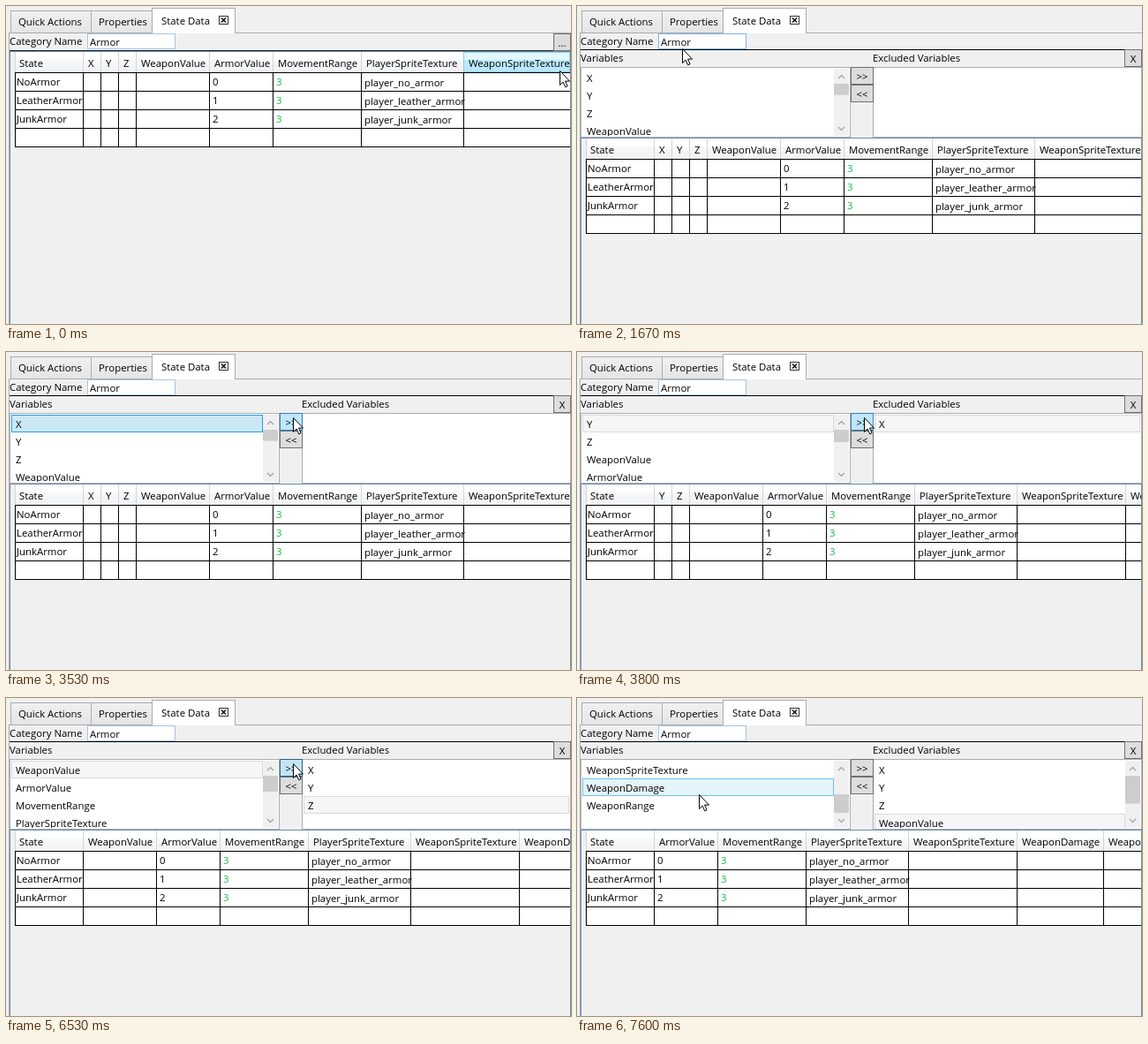
An HTML page for the animation above (8 s loop, 640x360 px).

```html
<!DOCTYPE html>
<html lang="en">
<head>
<meta charset="utf-8">
<title>State data editor</title>
<style>
html, body { margin: 0; width: 100%; height: 100%; overflow: hidden; background: #f0f0f0; }
svg { display: block; width: 640px; height: 360px; }
text { font: 11.4px "Open Sans", "Noto Sans", sans-serif; white-space: pre; }
</style>
</head>
<body>
<svg viewBox="0 0 640 360">
  <defs>
    <linearGradient id="head" x2="0" y2="1">
      <stop offset=".4" stop-color="#fff"/><stop offset=".4" stop-color="#f7f8fa"/><stop offset="1" stop-color="#f1f2f4"/>
    </linearGradient>
    <linearGradient id="headHover" x2="0" y2="1">
      <stop offset=".4" stop-color="#e3f7ff"/><stop offset=".4" stop-color="#bdedff"/><stop offset="1" stop-color="#b7e7fb"/>
    </linearGradient>
    <linearGradient id="tab" x2="0" y2="1">
      <stop stop-color="#f0f0f0"/><stop offset="1" stop-color="#e5e5e5"/>
    </linearGradient>
    <clipPath id="listView"><rect y="71" width="640" height="76"/></clipPath>
  </defs>
  <g id="stage"></g>
</svg>
<script>
const LOOP = 8000;
const VARIABLES = [
  ['X', 20], ['Y', 20], ['Z', 20], ['WeaponValue', 83], ['ArmorValue', 72], ['MovementRange', 100],
  ['PlayerSpriteTexture', 116], ['WeaponSpriteTexture', 123], ['WeaponDamage', 98], ['WeaponRange', 90]
].map(([name, width]) => ({ name, width }));
const STATES = [['NoArmor', 'player_no_armor'], ['LeatherArmor', 'player_leather_armor'], ['JunkArmor', 'player_junk_armor']];

// All times below count ticks of 1/15 s.
const OPEN_PRESS = 16, OPEN = 18, SELECT = 34, SCROLL = 114;
const CLICKS = [[55, 57], [67, 70], [83, 85], [98, 101]];
const PATH = [
  [0, 627, 73], [9, 630, 40], [21, 630, 40], [25, 119, 48], [26, 119, 48], [30, 81, 75], [37, 81, 75],
  [41, 152, 77], [50, 321, 75], [51, 321, 75], [53, 325, 74], [104, 325, 74], [111, 138, 109]
];
const BUTTON = { normal: ['#ddd', '#707070'], hover: ['#bee6fd', '#3c7fb1'], pressed: ['#c4e5f6', '#2c628b'] };
const ITEM = { hover: ['#e5f3fb', '#70c0e7'], active: ['#cbe8f6', '#26a0da'], inactive: ['#f6f6f6', '#dadada'] };

const rect = (x, y, w, h, fill) => `<rect x="${x}" y="${y}" width="${w}" height="${h}" fill="${fill}"/>`;
const box = (x, y, w, h, fill, edge) => rect(x, y, w, h, edge) + rect(x + 1, y + 1, w - 2, h - 2, fill);
const text = (x, y, s, fill = '#000', anchor = 'start') =>
  `<text x="${x}" y="${y}" fill="${fill}" text-anchor="${anchor}">${s.replace(/</g, '&lt;')}</text>`;
const line = (d, color, width) => `<path d="${d}" fill="none" stroke="${color}" stroke-width="${width}"/>`;
const inside = (p, x, y, w, h) => p.x >= x && p.x < x + w && p.y >= y && p.y < y + h;

function pointerAt(tick) {
  const next = PATH.findIndex(p => p[0] > tick);
  if (next < 0) {
    const [, x, y] = PATH[PATH.length - 1];
    return { x, y };
  }
  const [t0, x0, y0] = PATH[next - 1], [t1, x1, y1] = PATH[next];
  const s = (tick - t0) / (t1 - t0);
  return { x: Math.round(x0 + (x1 - x0) * s), y: Math.round(y0 + (y1 - y0) * s) };
}

function button(x, y, w, h, label, pointer, pressed) {
  const mode = pressed ? 'pressed' : inside(pointer, x, y, w, h) ? 'hover' : 'normal';
  return box(x, y, w, h, ...BUTTON[mode]) + text(x + w / 2, y + 15, label, '#000', 'middle');
}

function tabs() {
  return box(3, 30, 640, 340, '#f0f0f0', '#acacac')
    + box(5, 5, 92, 26, 'url(#tab)', '#acacac') + text(14, 22, 'Quick Actions')
    + box(96, 5, 70, 26, 'url(#tab)', '#acacac') + text(105, 22, 'Properties')
    + box(165, 2, 95, 29, '#fff', '#acacac') + rect(166, 30, 93, 1, '#fff') + text(176, 21, 'State Data')
    + box(241, 11, 11, 10, '#fff', '#333') + line('M244 13.5l5 5m0-5l-5 5', '#111', 1.6);
}

function categoryRow(pointer) {
  const hover = inside(pointer, 92, 31, 100, 19);
  return text(4, 44, 'Category Name')
    + box(92, 31, 100, 18, '#fff', hover ? '#7eb4ea' : '#a9c4de') + text(95, 45, 'Armor');
}

function scrollbar(x, total, offset) {
  const track = 42, thumb = track * 3 / total;
  return rect(x, 71, 17, 76, '#f0f0f0')
    + rect(x, 88 + track * offset / total, 17, thumb, '#cdcdcd')
    + line(`M${x + 5} 82l3.5-3.5 3.5 3.5M${x + 5} 137l3.5 3.5 3.5-3.5`, '#a0a0a0', 1.2);
}

function list(x, w, items, selected, mode, offset, pointer) {
  const scrolls = items.length > 3;
  const itemWidth = w - (scrolls ? 21 : 4);
  const rows = items.slice(offset, offset + 4).map((item, i) => {
    const y = 71 + 20 * i;
    const hover = inside(pointer, x + 2, y, itemWidth, 20);
    const look = i + offset === selected ? mode : hover ? 'hover' : null;
    return (look ? box(x + 2, y, itemWidth, 20, ...ITEM[look]) : '') + text(x + 7, y + 15, item.name);
  });
  return box(x, 69, w, 80, '#fff', '#abadb3')
    + `<g clip-path="url(#listView)">${rows.join('')}</g>`
    + (scrolls ? scrollbar(x + w - 19, items.length, offset) : '');
}

function exclusionPanel(tick, moved, pointer) {
  const included = VARIABLES.slice(moved), excluded = VARIABLES.slice(0, moved);
  const pressed = CLICKS.some(([down, up]) => tick >= down && tick < up);
  return rect(4, 49, 636, 1, '#000')
    + text(4, 63, 'Variables') + text(335, 63, 'Excluded Variables')
    + button(620, 49, 20, 20, 'X', pointer, false)
    + list(4, 306, included, tick >= SELECT ? 0 : -1, moved ? 'inactive' : 'active', tick >= SCROLL ? 3 : 0, pointer)
    + list(335, 305, excluded, moved - 1, 'inactive', 0, pointer)
    + button(310, 69, 26, 20, '>>', pointer, pressed)
    + button(310, 89, 26, 20, '<<', pointer, false);
}

function cell(name, row, x, y) {
  if (name === 'ArmorValue') return text(x, y, String(row));
  if (name === 'MovementRange') return text(x, y, '3', '#13bd43');
  if (name === 'PlayerSpriteTexture') return text(x, y + 1, STATES[row][1]);
  return '';
}

function dataGrid(top, columns, pointer) {
  const body = top + 24;
  let out = box(4, top, 636, 400, '#f0f0f0', '#688caf')
    + rect(11, top + 1, 628, 23, 'url(#head)') + rect(10, top + 1, 1, 23, '#d5d5d5')
    + rect(11, body, 628, 84, '#fff') + rect(10, body, 1, 85, '#000')
    + text(15, top + 18, 'State') + STATES.map(([name], i) => text(12, body + 15 + 21 * i, name)).join('');
  for (let i = 0; i < 5; i++) out += rect(10, body + 21 * i, 629, 1, '#000');

  let x = 88;
  out += rect(x - 1, top + 1, 1, 23, '#d5d5d5') + rect(x - 1, body, 1, 84, '#000');
  for (const { name, width } of columns) {
    if (x > 638) break;
    const visible = Math.min(width, 639 - x);
    if (inside(pointer, x, top + 1, width, 23)) out += box(x - 1, top + 1, visible + 1, 23, 'url(#headHover)', '#93c9e3');
    out += text(x + 5, top + 18, name);
    STATES.forEach((_, i) => { out += cell(name, i, x + 3, body + 15 + 21 * i); });
    x += width;
    if (x < 639) out += rect(x - 1, top + 1, 1, 23, '#d5d5d5') + rect(x - 1, body, 1, 84, '#000');
  }
  return out + rect(639, top, 1, 400, '#688caf');
}

const cursor = ({ x, y }) =>
  `<path transform="translate(${x + .5} ${y + .5})" d="M0 0V16L3.6 12.6 6.2 18.3 8.6 17.2 6 11.6H11Z" fill="#fff" stroke="#000"/>`;

function scene(tick) {
  const pointer = pointerAt(tick);
  const open = tick >= OPEN;
  const moved = CLICKS.filter(([, up]) => tick >= up).length;
  const middle = open
    ? exclusionPanel(tick, moved, pointer)
    : rect(4, 50, 636, 1, '#222') + button(620, 31, 20, 20, '...', pointer, tick >= OPEN_PRESS);
  return tabs() + categoryRow(pointer) + middle
    + dataGrid(open ? 149 : 51, VARIABLES.slice(moved), pointer) + cursor(pointer);
}

const stage = document.getElementById('stage');
let shown = -1;
function update(now) {
  const tick = Math.floor((now % LOOP) * .015 + .06) % 120;
  if (tick !== shown) stage.innerHTML = scene(shown = tick);
}
const start = performance.now();
function loop() {
  update(performance.now() - start);
  requestAnimationFrame(loop);
}
loop();
</script>
</body>
</html>
```
